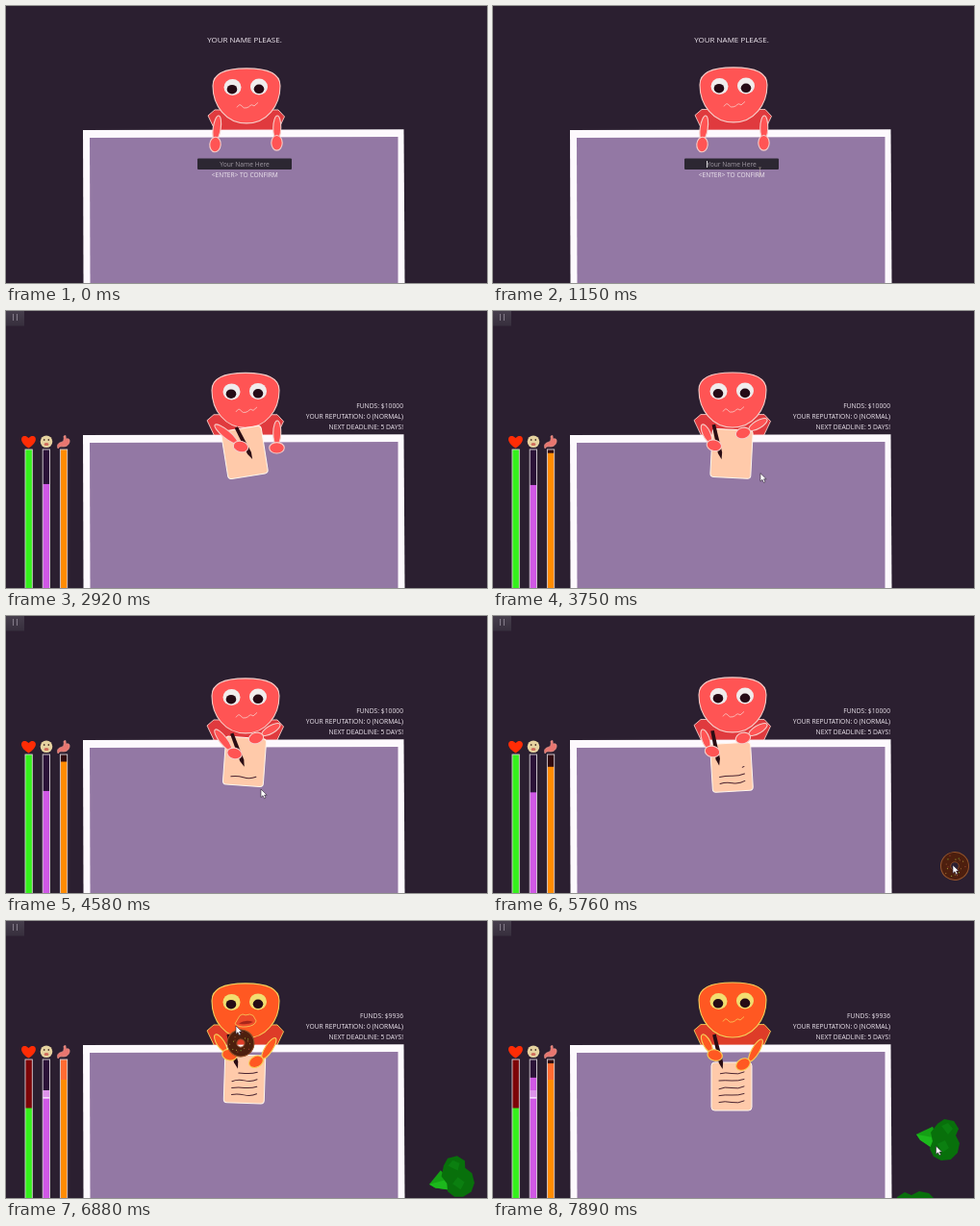
An HTML page for the animation above (7.99 s loop, 500x288 px).

```html
<!DOCTYPE html>
<html lang="en">
<head>
<meta charset="utf-8">
<title>Deadline desk</title>
<style>
  html, body { margin: 0; width: 100%; height: 100%; overflow: hidden; background: #2b1f30; }
  svg {
    display: block; width: 100vw; height: 100vh;
    --skin: color-mix(in srgb, #ff5822 var(--hot), #ff5454);
    --body: color-mix(in srgb, #de3c28 var(--hot), #e03a3e);
    --line: color-mix(in srgb, #f5d05c var(--hot), #f6cdc8);
    --eye: color-mix(in srgb, #f2de70 var(--hot), #f0ecec);
  }
  text { font-family: "Open Sans", "Noto Sans", sans-serif; fill: #eee6ef; }
  .skin { fill: var(--skin); stroke: var(--line); stroke-width: 1.1; }
  .body { fill: var(--body); stroke: var(--line); stroke-width: .9; }
  .eye { fill: var(--eye); }
  .mid { text-anchor: middle; }
  .stats { text-anchor: end; font-size: 6.75px; }
  .ink { fill: none; stroke: #4a2430; stroke-width: 1; stroke-linecap: round; }
</style>
</head>
<body>
<svg viewBox="0 0 500 288" preserveAspectRatio="none">
  <defs>
    <linearGradient id="btn" x2="0" y2="1">
      <stop stop-color="#463e4c"/><stop offset="1" stop-color="#372f3d"/>
    </linearGradient>
    <g id="tree">
      <path d="M-26-6L-9-14-4 0-7 10-22 0z" fill="#15a015"/>
      <path d="M-26-6L-10-3-7 10-22 0z" fill="#1cb81c"/>
      <path d="M-11-8L-4-17 3-22 13-20 18-12 15-5 19 3 17 13 10 20 0 21-8 17-12 9-9 1z" fill="#08700b"/>
      <path d="M0-15L7-18 12-12 7-6zM-4 4L4 0 8 8 1 13z" fill="#0b7f10"/>
    </g>
  </defs>
  <rect width="500" height="288" fill="#2b1f30"/>

  <path id="torso" class="body" d="M217 108L210 114 219 133H281L289.500 115 283 108z"/>
  <path d="M80 129L413.500 128.300L414.500 288H80.500z" fill="#fdf9fd"/>
  <path d="M87 137L407.500 136V288H87.500z" fill="#9378a4"/>

  <g id="head">
    <path class="skin" d="M250 65C270 65 285 69 285 83C285 104 271 122 250 122S215 104 215 83C215 69 230 65 250 65z"/>
    <ellipse class="eye" cx="235.500" cy="84.500" rx="9" ry="8.500"/>
    <ellipse class="eye" cx="263" cy="84" rx="9" ry="8.500"/>
    <g fill="#260b16">
      <ellipse cx="235" cy="86.800" rx="5.300" ry="4.800"/>
      <ellipse cx="263" cy="86.400" rx="5.300" ry="4.800"/>
    </g>
    <path id="squiggle" d="M240 105.500Q243 101 245 104T250 106 254 103.500 258 104L262 100.500" fill="none" stroke="var(--line)" stroke-width=".8"/>
    <g id="lips">
      <path d="M239 107L244 98.500Q247 96 250 98Q255 96 258 98.500L261 104Q260 109 251 110Q243 111 239 107z" fill="#ee4a2a" stroke="var(--line)" stroke-width=".8"/>
      <path id="gap" d="M243 106.500Q250 102 258 105Q251 109 243 106.500z" fill="#a8261a"/>
    </g>
  </g>

  <g id="work">
    <g id="paper">
      <rect x="-21" y="-25" width="42" height="50" rx="3.500" fill="#ffcaaa" stroke="#fff6ee"/>
    </g>
    <path id="pen" d="M-1.800-18H1.800L2.200 12 0 19-2.200 12z" fill="#2a0d14"/>
  </g>
  <ellipse id="armL" class="skin" ry="4"/>
  <ellipse id="armR" class="skin" ry="4"/>
  <ellipse id="handL" class="skin" rx="7.800" ry="5.700"/>
  <ellipse id="handR" class="skin" rx="7.800" ry="5.700"/>

  <g id="intro">
    <text id="ask" class="mid" x="248" y="38.300" font-size="8">YOUR NAME PLEASE.</text>
    <rect x="199" y="158.500" width="98" height="11.500" rx="1" fill="#2c2732"/>
    <text id="field" class="mid" x="248" y="166.600" font-size="6.700"></text>
    <path id="caret" d="M222.500 161V168" stroke="#eee" stroke-width=".9"/>
    <text class="mid" x="248.300" y="178" font-size="6.600">&lt;ENTER&gt; TO CONFIRM</text>
  </g>

  <g id="game">
    <rect width="19" height="15.500" fill="url(#btn)"/>
    <path d="M7.500 3V10M11.500 3V10" stroke="#847c8a"/>
    <text class="stats" id="funds" x="413" y="100.700"></text>
    <text class="stats" x="413" y="111.700">YOUR REPUTATION: 0 (NORMAL)</text>
    <text class="stats" x="413" y="122.700">NEXT DEADLINE: 5 DAYS!</text>
    <g id="bars"></g>
    <path d="M23.500 142.500C10 134 18 126 23.500 132C29 126 37 134 23.500 142.500z" fill="#ff2c05"/>
    <circle cx="42" cy="135.700" r="6.300" fill="#e6d3a0"/>
    <path d="M39.700 133V135M44.300 133V135" stroke="#5a4335" stroke-width="1.300"/>
    <ellipse cx="42" cy="138.500" rx="2.500" ry="1.500" fill="#cf6a5a"/>
    <path d="M62 129.500Q62 133 63 133C68 131 67 141 60 141Q55 140 54 143Q52 138 57 136.500Q61 136 60 130z" fill="#e87670" stroke="#f2a093" stroke-width=".6"/>
    <use id="tree0" href="#tree"/>
    <use id="tree1" href="#tree"/>
    <g id="donut">
      <circle r="9.500" fill="none" stroke="#4d1f0e" stroke-width="10.500"/>
      <circle r="14.500" fill="none" stroke="#94552e"/>
      <circle r="4.300" fill="none" stroke="#8a4a26" stroke-width=".9"/>
    </g>
  </g>
  <path id="arrow" d="M0 0V8.500L2 6.700 3.500 9.800 5 9 3.600 6.100H6.200z" fill="#fff" stroke="#2b1f30" stroke-width=".6"/>
  <path id="beam" d="M276 168H279M277.500 168V176M276 176H279" stroke="#d8ccb8" stroke-width=".7" opacity=".6"/>
</svg>
<script>
const LOOP = 7990, START = 2550, WRITE = 2920, EAT = 6450, FED = 6600;
const NAME = 'Pinch Claw of Lower Tidepool';
const $ = id => document.getElementById(id);
const clamp = v => Math.max(0, Math.min(1, v));
const ramp = (t, a, b) => clamp((t - a) / (b - a));
const ease = (t, a, b) => { const u = ramp(t, a, b); return u * u * (3 - 2 * u); };
const mix = (a, b, u) => a + (b - a) * u;
const toward = (p, q, u) => p.map((v, i) => mix(v, q[i], u));
const set = (el, attrs) => { for (const k in attrs) el.setAttribute(k, attrs[k]); };
const show = (el, on) => el.setAttribute('visibility', on ? 'inherit' : 'hidden');
const place = (el, x, y, r = 0, s = 1) =>
  el.setAttribute('transform', `translate(${x} ${y}) rotate(${r}) scale(${s})`);

function make(parent, tag, attrs) {
  const el = document.createElementNS('http://www.w3.org/2000/svg', tag);
  set(el, attrs);
  return parent.appendChild(el);
}

const lines = Array.from({ length: 5 }, (_, i) => make($('paper'), 'path', {
  class: 'ink', pathLength: 1,
  d: `M13 ${15 - 7.5 * i}q-6 ${3 - i % 2} -13 1.500t-13 ${i % 3 * .6}`
}));

for (let i = 0; i < 16; i++) {
  const a = i * 2.4, r = 7 + i * 37 % 6;
  make($('donut'), 'circle', {
    cx: r * Math.cos(a), cy: r * Math.sin(a), r: .6, fill: `hsl(${i * 25 % 90} 50% 42%)`
  });
}

function bar(slot, empty, ...colors) {
  const box = { x: 20 + 18.2 * slot, width: 7.3 };
  const frame = { ...box, y: 144, height: 150 };
  make($('bars'), 'rect', { ...frame, fill: empty });
  const fills = colors.map(fill => make($('bars'), 'rect', { ...box, fill }));
  make($('bars'), 'rect', { ...frame, fill: 'none', stroke: '#d8d0d6', 'stroke-width': .9 });
  return fills;
}
const level = (el, top, bottom = 290) => set(el, { y: top, height: Math.max(0, bottom - top) });
const [life] = bar(0, '#7d0508', '#35f01c');
const [joy, joyNew, joyMark] = bar(1, '#2b1238', '#d058e6', '#dd93ea', '#fbe9ff');
const [food, foodNew] = bar(2, '#320b10', '#ff8c00', '#ff6c32');

function limb(el, x1, y1, x2, y2) {
  const dx = x2 - x1, dy = y2 - y1;
  el.setAttribute('rx', Math.hypot(dx, dy) / 2 + 1);
  place(el, (x1 + x2) / 2, (y1 + y2) / 2, Math.atan2(dy, dx) * 180 / Math.PI);
}

function drawIntro(t) {
  const count = Math.floor(ramp(t, 1720, 2400) * NAME.length);
  $('field').textContent = count ? NAME.slice(0, count) : 'Your Name Here';
  $('field').setAttribute('fill-opacity', count ? .9 : .6);
  show($('caret'), t > 960 && t < 1720 && (t - 960) % 800 < 450);
  $('ask').setAttribute('opacity', 1 - ramp(t, 2400, 2520));
}

function drawCrab(t) {
  document.body.style.setProperty('--hot', 100 * ramp(t, EAT, 6700) + '%');
  const x = -ease(t, 2400, 2900), bob = -.6 + .5 * Math.cos(t / 370);
  place($('head'), x, bob);
  place($('torso'), x, bob * .4);
  const eating = t > EAT && t < 7350;
  show($('squiggle'), !eating);
  show($('lips'), eating);
  show($('gap'), Math.sin((t - 6880) / 75) > -.2);

  // The left hand scribbles while the right one steadies the sheet.
  const reach = ease(t, START, WRITE), grab = ease(t, WRITE, 3350), low = ease(t, 5760, 7200);
  const swing = (t - WRITE) / 516 * 2 * Math.PI;
  const lx = mix(217.5, 236 + 8 * Math.cos(swing), reach);
  const ly = mix(144, 141 + 2 * Math.sin(swing), reach);
  const rx = mix(281.5, 260, grab), ry = 142.3 - 15.3 * grab + 22 * low;
  place($('handL'), lx, ly, 95 - 82 * reach);
  place($('handR'), rx, ry, 90 * (1 - reach) - 15 * grab - 15 * low);
  limb($('armL'), 221 - 3 * reach, 115 + 4 * reach, lx - 4 * reach, ly - 5 + reach);
  limb($('armR'), 282 + 2 * grab - 5 * low, 115 - 2 * grab + 11 * low, rx + 7 * grab, ry - 4);
  place($('pen'), lx + 3.5, ly - 4, -19 - 8 * Math.cos(swing));

  // The sheet slides down as it fills, and its wobble dies away.
  const done = ramp(t, WRITE, 7890);
  const wobble = Math.cos((t - WRITE) / 1320 * Math.PI);
  place($('paper'), 248, 147 + 25 * done ** 1.6, -9 * (1 - done) * wobble);
  lines.forEach((el, i) => {
    const part = clamp(((t - 3200) / 960 - i - .65) / .25);
    el.setAttribute('stroke-dasharray', `${part} 2`);
    show(el, part > 0);
  });
}

function drawGame(t) {
  const fed = t > FED;
  $('funds').textContent = t < EAT ? 'FUNDS: $10000' : 'FUNDS: $9936';
  const hunger = 144 + .0045 * Math.max(0, t - (fed ? 6950 : WRITE));
  const mood = fed ? 176 - (t - 6880) * .013 : 179.5 + (t - START) * .0012;
  level(life, 144 + 50.5 * ramp(t, EAT, 6700));
  level(joy, mood);
  level(food, hunger);
  level(joyNew, Math.max(mood, 176), fed ? 184 : 0);
  level(joyMark, 183.2, fed ? 184.6 : 0);
  level(foodNew, hunger, fed ? 165 : 0);

  const drag = ease(t, 5950, FED);
  const drift = [480, 303 - (Math.min(t, 5950) - 4580) * .0364];
  place($('donut'), ...toward(drift, [244, 127], drag), t * .03, 1 - .04 * drag - .6 * ramp(t, 6950, 7300));
  show($('donut'), t > 4500 && t < 7300);

  for (let i = 0; i < 2; i++) {
    const age = t - 6070 - 1820 * i;
    place($('tree' + i), 466 - 26 * i, 300 - age * .0396, -47 - 43 * i + age * .026);
  }
}

function drawPointer(t) {
  let p = toward([368, 233], [277, 171], ease(t, 70, 840));
  if (t > START) {
    p = toward([281, 166], [265, 180], ease(t, 3500, 4400));
    p = toward(p, [478, 259], ease(t, 4700, 5400));
    p = toward(p, [239, 109], ease(t, 5950, FED));
    p = toward(p, [460.5, 234], ease(t, 7050, 7650));
  }
  place($('arrow'), ...p);
  show($('arrow'), (t > 70 && t < 880) || t > 3500);
  show($('beam'), t >= 880 && t < 1650);
}

function draw(t) {
  const playing = t >= START;
  show($('intro'), !playing);
  show($('game'), playing);
  show($('work'), playing);
  drawIntro(t);
  drawGame(t);
  drawCrab(t);
  drawPointer(t);
}

const t0 = performance.now();
function tick() {
  draw((performance.now() - t0) % LOOP);
  requestAnimationFrame(tick);
}
draw(0);
requestAnimationFrame(tick);
</script>
</body>
</html>
```
